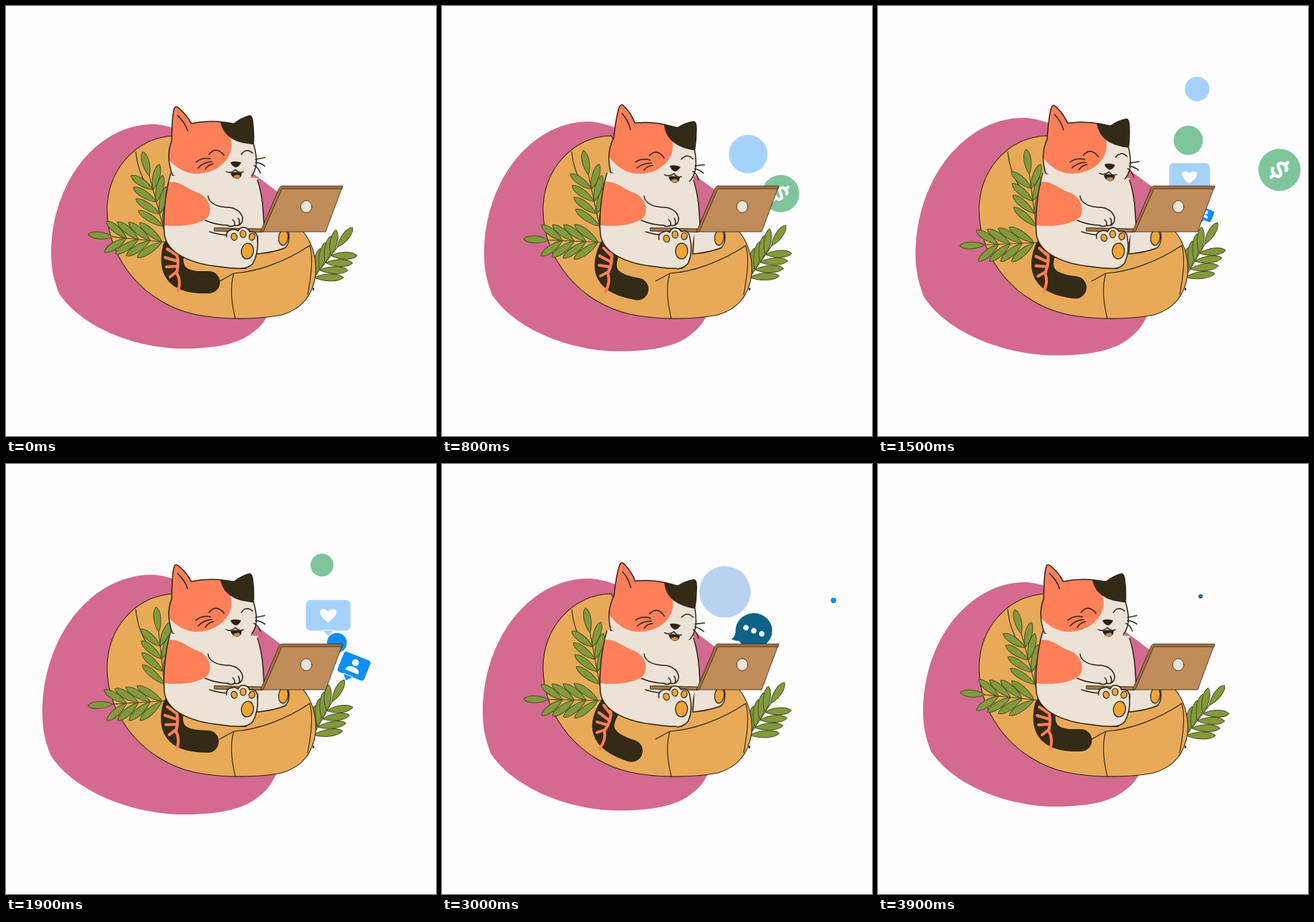
Recreate the animation shown at these times as an HTML page with a canvas. Size 600 by 600 pixels, loop 4000 ms.

```html
<!DOCTYPE html>
<html lang="en">
<head>
<meta charset="utf-8">
<title>Cat on a beanbag</title>
<style>
html, body { margin: 0; width: 100%; height: 100%; overflow: hidden; background: #fffdfe; }
canvas { display: block; width: 600px; height: 600px; }
</style>
</head>
<body>
<canvas id="stage" width="600" height="600"></canvas>
<script>
const ctx = document.getElementById('stage').getContext('2d');
const LOOP = 4000, STEP = 100, TAU = Math.PI * 2;
const INK = '#2c2418', CREAM = '#ece2d6', ORANGE = '#ff7f59', BLACK = '#342b16',
  BEAN = '#e8aa58', PAD = '#eda536', LEAF = '#829a3c', PINK = '#d46a8f', WOOD = '#c08c59';
const SKY = '#a5d2fb', GREEN = '#7ec59b', BLUE = '#0b8ff7', MIST = '#b8d2ef', TEAL = '#0f6187';

const shape = {
  blob: 'M209,165 C262,170 330,222 384,263 C402,300 388,400 362,437 Q357,446 345,455 C325,472 290,478 248,478 C180,478 105,448 74,401 C67,383 63,367 63,345 C63,305 74,260 101,223 C128,187 165,164 209,165Z',
  bean: 'M236,181 C180,183 141,230 141,284 C141,355 195,415 262,430 C300,438 350,438 385,431 C412,423 428,405 432,375 C434,350 426,328 414,314 L300,300Z',
  seams: 'M181,203 C183,222 188,238 198,252 M298,384 L318,373 C350,371 390,357 424,334 M318,373 C311,395 316,420 320,436 M424,335 C430,355 424,385 421,403',
  body: 'M229,232 C222,260 219,295 221,318 C224,345 258,360 300,364 Q330,369 342,362 L352,320 L359,312 C360,285 357,260 351,240Z',
  bodyLines: 'M230,233 C222,260 219,295 221,318 C224,345 258,360 300,364 Q320,367 335,366 M351,243 C358,265 359,285 360,308',
  bodyPatch: 'M226,246 C240,242 254,256 266,260 C284,266 288,284 282,294 C273,304 248,309 221,306 Q220,270 226,246Z',
  arm: 'M282,265 C283,276 296,281 312,281 C326,283 333,294 329,302 Q325,308 319,306 Q314,309 309,306 M278,299 Q294,306 310,306 M316,298 Q320,301 319,306 M324,296 Q327,300 325,305 M284,315 Q296,319 310,320',
  farFoot: 'M350,346 Q378,343 390,337 Q397,330 394,314 L352,314Z',
  foot: 'M308,322 Q307,313 316,312 Q321,311 324,314 Q328,306 336,310 Q339,312 340,315 Q350,313 351,324 Q353,345 344,360 Q338,366 328,366',
  head: 'M334,245 C310,249 260,249 232,236 C227,222 224,205 231,188 C231,170 231,155 234,144 Q236,138 241,143 Q252,152 258,164 Q280,159 304,162 L318,164 Q328,156 339,153 Q343,152 344,162 Q346,178 345,192 C351,212 353,232 334,245',
  facePatch: 'M299,158 C314,175 318,195 311,208 C302,227 280,235 262,234 Q240,231 224,211 L220,130 L270,135Z',
  earPatch: 'M298,158 C301,181 318,192 348,193 L350,140Z',
  face: 'M239,153 Q249,162 253,174 M283,207 Q293,195 304,208 M328,207 Q335,197 344,205 M265,218 Q273,211 285,213 M268,226 Q275,218 287,217 M278,228 Q281,222 289,220 M348,214 L361,211 M348,218 Q356,219 361,223 M346,222 Q352,225 355,233 M307,231 Q314,234 320,228 Q325,234 331,231',
  nose: 'M313,218 Q320,215 328,218 Q325,225 320,225 Q315,223 313,218Z',
  mouth: 'M313,233 Q320,230 329,233 Q328,241 321,241 Q315,239 313,233Z',
  tail: 'M234,338 C226,374 243,387 283,385.5',
  stripes: 'M236,340 Q243,356 238,372 Q245,384 240,398 M239,348 L225,339 M239,356 L222,351 M239,363 L224,364 M239,370 L229,378',
  screen: 'M384,253 L469,253 L446,315 L356,315Z',
  rim: 'M384,251 L470,251 L469,255 L385,255 L359,315 L355,315 L381,254Z',
  base: 'M291,309.5 L357,311 L357,315.5 L291,314Z',
  heart: 'M0,9 C-18,-3 -9,-13 0,-5 C9,-13 18,-3 0,9Z',
  dollar: 'M9,-9 C5,-17 -10,-14 -9,-6 C-8,1 9,-1 9,6 C9,14 -6,16 -10,8 M0,-21 V-14 M0,14 V21',
  person: 'M-9,8 Q-9,1 0,1 Q9,1 9,8Z',
  chat: 'M-26,2 Q-27,9 -32,12 Q-22,16 -14,14Z'
};
for (const key in shape) shape[key] = new Path2D(shape[key]);

// Each icon drifts in a straight line and swells then shrinks over its life.
const icons = [
  { draw: plain(SKY), born: 250, life: 1550, from: [413, 278], to: [453, 77], size: 30 },
  { draw: money, born: 500, life: 1350, from: [435, 276], to: [604, 212], size: 40.5 },
  { draw: plain(GREEN), born: 650, life: 1750, from: [416, 286], to: [451, 83], size: 20.5 },
  { draw: like, born: 1000, life: 1500, from: [416, 273], to: [472, 170], size: 1.15 },
  { draw: contact, born: 1200, life: 1700, from: [435, 297], to: [558, 261], size: 1.12 },
  { draw: plain(BLUE), born: 1500, life: 1600, from: [431, 271], to: [554, 185], size: 19.5 },
  { draw: plain(MIST), born: 2000, life: 1650, from: [413, 293], to: [383, 104], size: 38 },
  { draw: chat, born: 2450, life: 1500, from: [426, 262], to: [451, 182], size: 28 }
];

const mix = (a, b, f) => a + (b - a) * f;

// Half a sine wave between two times, zero outside.
function bump(t, from, to) {
  const u = (t - from) / (to - from);
  return u > 0 && u < 1 ? Math.sin(Math.PI * u) : 0;
}

function fill(path, color) { ctx.fillStyle = color; ctx.fill(path); }
function line(path, width = 1.5, color = INK) {
  ctx.strokeStyle = color;
  ctx.lineWidth = width;
  ctx.stroke(path);
}
function outlined(path, color, width) { fill(path, color); line(path, width); }
function oval(x, y, rx, ry, color, tilt = 0, outline = 0) {
  const p = new Path2D();
  p.ellipse(x, y, rx, ry, tilt, 0, TAU);
  fill(p, color);
  if (outline) line(p, outline);
}
function group(draw) { ctx.save(); draw(); ctx.restore(); }
function about(x, y, angle, scale, draw) {
  group(() => {
    ctx.translate(x, y);
    ctx.rotate(angle);
    ctx.scale(scale, scale);
    ctx.translate(-x, -y);
    draw();
  });
}

function plain(color) { return size => oval(0, 0, size, size, color); }

function bubble(w, h, tipX, color) {
  const p = new Path2D();
  p.roundRect(-w / 2, -h / 2, w, h, w * .1);
  p.moveTo(tipX - 7, h / 2 - 1);
  p.lineTo(tipX, h / 2 + 7);
  p.lineTo(tipX + 7, h / 2 - 1);
  fill(p, color);
}
function money(size) {
  oval(0, 0, size, size, GREEN);
  ctx.scale(size / 40, size / 40);
  ctx.rotate(.85);
  line(shape.dollar, 6.5, '#fff');
}
function like(size) {
  ctx.scale(size, size);
  bubble(57, 39, 0, SKY);
  fill(shape.heart, '#fff');
}
function contact(size) {
  ctx.scale(size, size);
  ctx.rotate(.38);
  bubble(37, 28, -3, BLUE);
  oval(0, -5, 4.5, 4.5, '#fff');
  fill(shape.person, '#fff');
}
function chat(size) {
  ctx.scale(size / 26, size / 26);
  oval(0, 0, 26, 25, TEAL);
  fill(shape.chat, TEAL);
  ctx.rotate(.37);
  for (const x of [-12, 0, 12]) oval(x, 0, 3.8, 3.8, '#fff');
}

function leaf(x, angle, len) {
  group(() => {
    ctx.translate(x, 0);
    ctx.rotate(angle);
    const p = new Path2D(), w = 6.5;
    p.moveTo(0, 0);
    p.bezierCurveTo(len * .35, -w, len * .85, -w, len, 0);
    p.bezierCurveTo(len * .85, w, len * .35, w, 0, 0);
    fill(p, LEAF);
    line(p, 1, '#4a5122');
  });
}
function frond(x, y, angle, stem, spreadA, spreadB) {
  group(() => {
    ctx.translate(x, y);
    ctx.rotate(angle);
    line(new Path2D(`M0,0 H${stem}`), 1.2, '#4a5122');
    for (let i = 0; i < 4; i++) {
      const at = stem * (.13 + i * .21), len = 41 - i * 1.5;
      leaf(at, -spreadA, len);
      leaf(at, spreadB, len);
    }
    leaf(stem, 0, 35);
  });
}

function drawTail(swing) {
  about(232, 340, swing * .35, 1, () => {
    line(shape.tail, 31, INK);
    line(shape.tail, 29, BLACK);
    line(shape.stripes, 4, ORANGE);
  });
}

function drawHead(turn) {
  about(270, 264, turn * .115, 1, () => {
    fill(shape.head, CREAM);
    group(() => {
      ctx.clip(shape.head);
      fill(shape.facePatch, ORANGE);
      fill(shape.earPatch, BLACK);
    });
    group(() => {
      // The chin has no outline.
      ctx.beginPath();
      ctx.rect(200, 100, 200, 137);
      ctx.clip();
      line(shape.head);
    });
    line(shape.face);
    fill(shape.nose, INK);
    fill(shape.mouth, INK);
    oval(322, 238, 4.5, 2.5, '#c78d52', -.15);
  });
}

function drawFoot(turn) {
  about(335, 362, turn * -.14, 1, () => {
    outlined(shape.foot, CREAM);
    oval(337, 342, 8.5, 11, PAD, .15, 1.3);
    for (const i of [-1, 0, 1]) oval(331 + i * 12.5, 318 + i * i * 4, 4.1, 5, PAD, i * .25, 1.2);
  });
}

function drawLaptop() {
  outlined(shape.base, '#a87748', .9);
  outlined(shape.screen, WOOD, .8);
  outlined(shape.rim, '#a06f43', .7);
  oval(419, 280, 7.8, 8.5, CREAM, 0, .8);
}

function drawIcon({ draw, born, life, from, to, size }, t) {
  const swell = bump(t, born, born + life), u = (t - born) / life;
  if (!swell) return;
  group(() => {
    ctx.translate(mix(from[0], to[0], u), mix(from[1], to[1], u));
    draw(size * swell);
  });
}

function render(t) {
  const sway = (1 - Math.cos(t / LOOP * TAU)) / 2;
  const turn = Math.abs(Math.sin((t + STEP / 2) / LOOP * TAU)) ** 1.3;
  const swing = .62 * bump(t, 0, 2000) + bump(t, 2200, 3900);

  ctx.fillStyle = '#fffdfe';
  ctx.fillRect(0, 0, 600, 600);
  ctx.lineCap = ctx.lineJoin = 'round';

  about(243, 317, 0, 1 + .069 * sway, () => fill(shape.blob, PINK));
  frond(425, 385, -.915 - .145 * sway, 61, .45, .92);
  outlined(shape.bean, BEAN, 1.1);
  line(shape.seams, 1.1);
  oval(429, 395, 1.2, 2, INK);
  frond(222, 318, -1.836 + .16 * sway, 84, .74, .5);
  frond(228, 330, Math.PI + .1 - .165 * sway, 79, .66, .6);

  drawTail(swing);
  outlined(shape.farFoot, CREAM);
  oval(387, 323, 6.5, 11, PAD, .1, 1.2);
  fill(shape.body, CREAM);
  drawHead(turn);
  fill(shape.bodyPatch, ORANGE);
  line(shape.bodyLines);

  for (const icon of icons) drawIcon(icon, t);
  drawLaptop();
  line(shape.arm);
  drawFoot(turn);
}

const start = performance.now();
function tick() {
  const elapsed = (performance.now() - start) % LOOP;
  render(Math.floor(elapsed / STEP) * STEP);
  requestAnimationFrame(tick);
}
tick();
</script>
</body>
</html>
```
